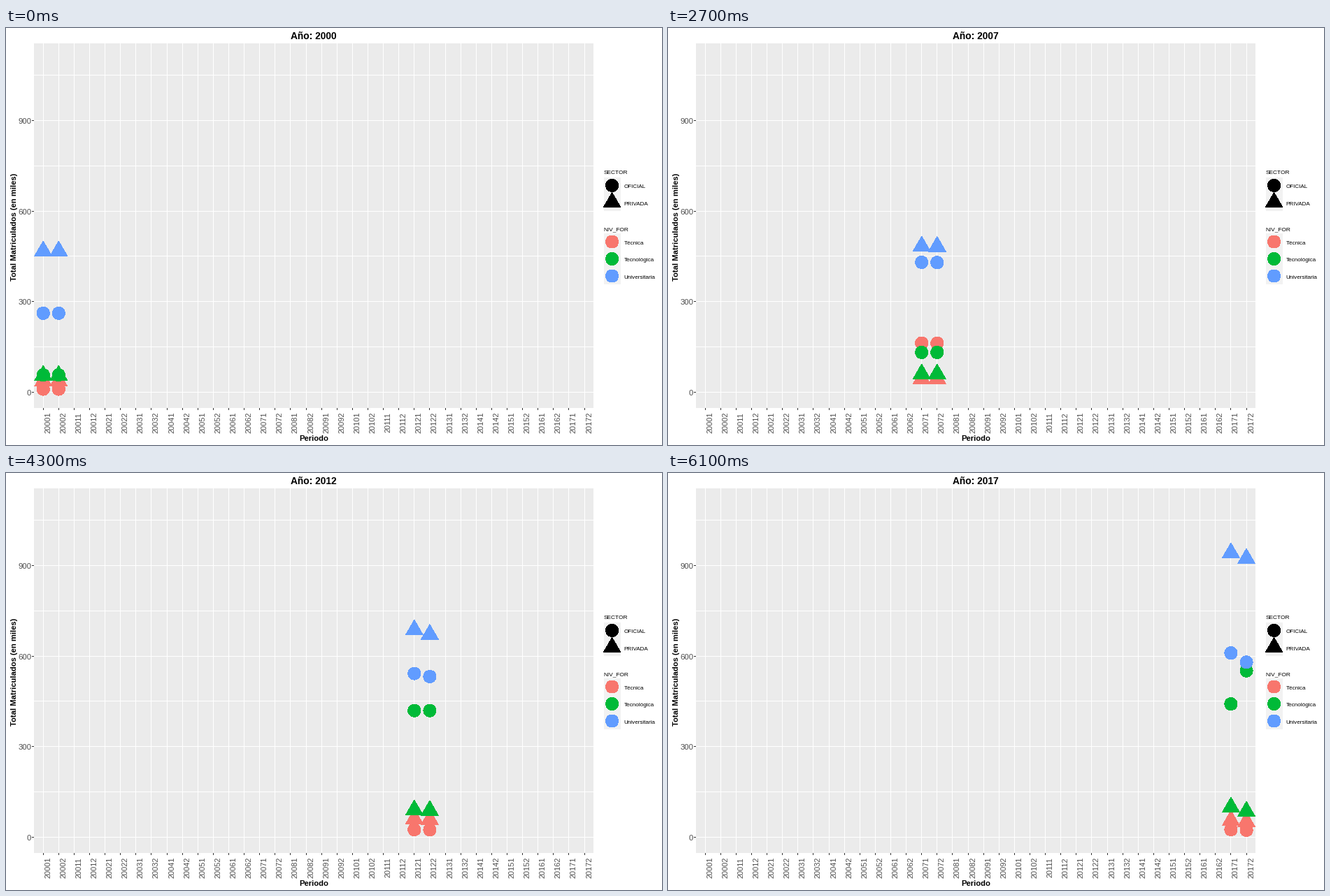
Animation, 938 px wide and 597 px high, one loop 8 s. Source, as a matplotlib script:

```python
import math

import matplotlib.pyplot as plt
import numpy as np
from matplotlib.animation import FuncAnimation
from matplotlib.patches import Circle, Polygon, Rectangle

W, H, DPI = 938, 597, 64
PT = 72 / DPI  # points per pixel
TICK_MS, LOOP_MS = 100, 8000
START_MS, STEP_MS, STEPS = 500, 200, 29
FIRST, LAST = 2000, 2017

RED, GREEN, BLUE = "#F8766D", "#00BA38", "#619CFF"
X0, DX = 53.2, 22.11
Y0, DY = 521, 0.4315
R = 8.5  # point size

# colour, is triangle, first-semester trend,
# second-semester dip around 2010 and change in the last year
SERIES = [
    (RED, False, {2000: 8, 2004: 47, 2007: 161, 2009: 140, 2010: 46, 2012: 23}, 0.2, -0.08),
    (RED, True, {2000: 34, 2010: 45, 2014: 72, 2017: 53}, 0.27, -0.08),
    (GREEN, False, {2000: 55, 2004: 83, 2007: 130, 2009: 232, 2010: 375,
                    2012: 418, 2014: 496, 2016: 500, 2017: 440}, 0, 0.25),
    (GREEN, True, {2000: 53, 2007: 58, 2014: 100, 2017: 97}, 0.13, -0.14),
    (BLUE, False, {2000: 260, 2007: 429, 2010: 480, 2012: 541, 2017: 609}, 0.11, -0.05),
    (BLUE, True, {2000: 466, 2004: 451, 2007: 482, 2010: 567, 2014: 804, 2017: 941}, 0.13, -0.02),
]
YEARS = np.arange(FIRST, LAST + 1)
KEY_STEPS = np.round((YEARS - FIRST) * STEPS / (LAST - FIRST))

fig = plt.figure(figsize=(W / DPI, H / DPI), dpi=DPI, facecolor="white")
ax = fig.add_axes([0, 0, 1, 1])
ax.set(xlim=(0, W), ylim=(H, 0))
ax.axis("off")


def box(x, y, w, h, color):
    ax.add_patch(Rectangle((x, y), w, h, fc=color, lw=0, aa=False, zorder=1))


def label(x, y, text, px, color="black", ha="left", rotation=0, weight="normal"):
    return ax.text(x, y, text, size=px * PT, color=color, ha=ha, va="baseline",
                   rotation=rotation, rotation_mode="anchor", weight=weight,
                   family="Liberation Sans", zorder=5)


def triangle_xy(x, y):
    top, side, base = 1.555 * R + 1, 1.347 * R + 0.87, 0.778 * R + 0.5
    return [(x, y - top), (x + side, y + base), (x - side, y + base)]


def point(x, y, color, is_triangle):
    style = dict(fc=color, lw=0, aa=False, zorder=3)
    patch = Polygon(triangle_xy(x, y), **style) if is_triangle else Circle((x, y), R + 0.5, **style)
    return ax.add_patch(patch)


def move(patch, x, y):
    if isinstance(patch, Circle):
        patch.center = x, y
    else:
        patch.set_xy(triangle_xy(x, y))


def enrolled(trend, dip, change, semester):
    values = np.interp(YEARS, list(trend), list(trend.values()))
    bump = np.exp(-((YEARS - 2010) / 1.5) ** 2)
    late = 1 - dip * bump + change * np.maximum(YEARS - LAST + 1, 0)
    return values * late if semester else values


# Panel, grid and axes
box(40, 22, 800, 522, "#EBEBEB")
for value in range(0, 1051, 150):
    y = math.floor(Y0 - DY * value)
    box(40, y, 800, 1, "white")
    if value % 300 == 0:
        box(37, y, 3, 1, "#333333")
        label(36.3, y + 5, str(value), 11.2, "#4D4D4D", "right")
for k in range(36):
    x = math.floor(X0 + DX * k)
    box(x, 22, 1, 522, "white")
    box(x, 544, 1, 3, "#333333")
    label(x + 10.5, 565, f"{FIRST + k // 2}{k % 2 + 1}", 11, "#4D4D4D", "center", 90)

title = label(439.7, 16, "", 13.8, ha="center", weight="bold")
label(440, 591, "Periodo", 11.3, ha="center", weight="bold")
label(15.3, 285, "Total Matriculados (en miles)", 11.2, ha="center", rotation=90, weight="bold")

# Legends
label(854.5, 209, "SECTOR", 8.4)
label(854.5, 290, "NIV_FOR", 8.4)
box(855, 214, 24, 48, "#F2F2F2")
box(855, 294, 24, 73, "#F2F2F2")
for y, text, color in [(225.4, "OFICIAL", "black"), (249.8, "PRIVADA", "black"),
                       (306, "Técnica", RED), (330.5, "Tecnológica", GREEN),
                       (355, "Universitaria", BLUE)]:
    point(866.6, y, color, text == "PRIVADA")
    label(883.3, y + 4, text, 8.1)

points = [(point(0, 0, color, is_triangle), semester, enrolled(trend, dip, change, semester))
          for color, is_triangle, trend, dip, change in SERIES for semester in (0, 1)]


def draw(frame):
    elapsed = frame * TICK_MS - START_MS
    step = min(max(elapsed // STEP_MS + 1, 0), STEPS)
    year = np.interp(step, KEY_STEPS, YEARS)
    for patch, semester, values in points:
        x = X0 + DX * (2 * (year - FIRST) + semester)
        move(patch, x, Y0 - 0.5 - DY * np.interp(year, YEARS, values))
    title.set_text(f"Año: {round(FIRST + (LAST - FIRST) * step / STEPS)}")
    return [title]


anim = FuncAnimation(fig, draw, frames=LOOP_MS // TICK_MS, interval=TICK_MS,
                     init_func=lambda: draw(0), repeat=True, repeat_delay=0)
plt.show()
```
